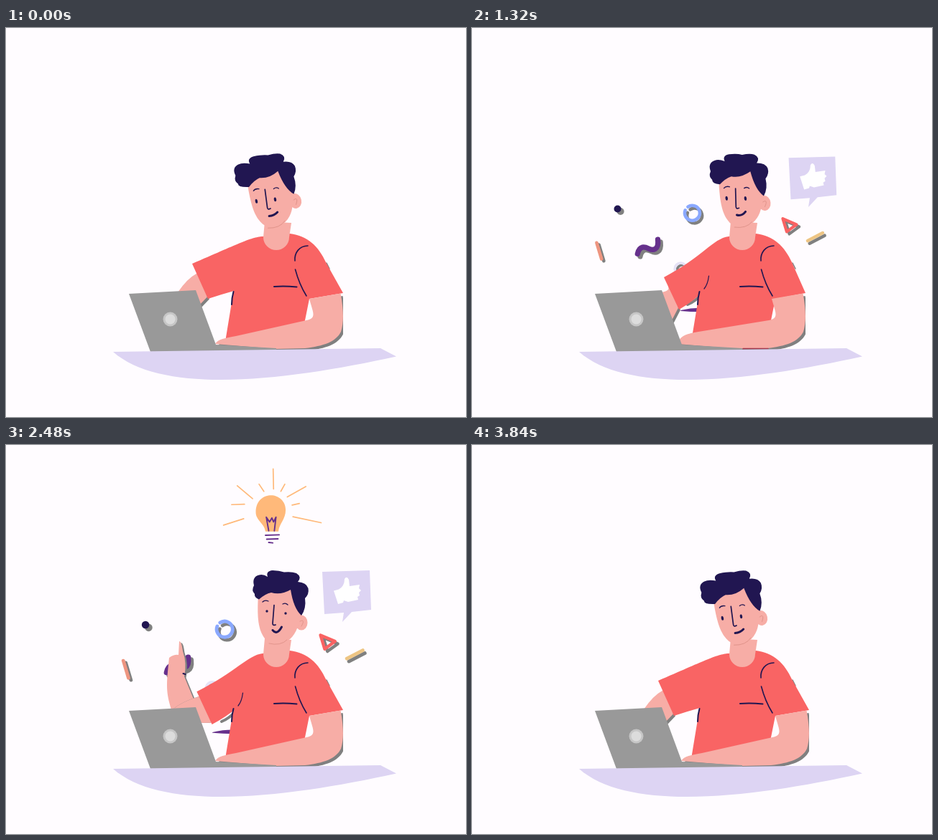
An HTML page with a canvas for the animation above (3880 ms loop, 640 by 543 pixels).

```html
<!DOCTYPE html>
<html lang="en">
<head>
<meta charset="utf-8">
<title>Idea at the laptop</title>
<style>
html, body { margin: 0; width: 640px; height: 543px; overflow: hidden; background: #fffcff }
canvas { display: block }
</style>
</head>
<body>
<canvas id="stage" width="640" height="543"></canvas>
<script>
const LOOP = 3880;
const ctx = document.getElementById('stage').getContext('2d');
const SKIN = '#f7ada6', SHIRT = '#f96464', NAVY = '#211651', LAVENDER = '#ddd4f3',
  PURPLE = '#66308c', ORANGE = '#ffb97a', GREY = '#999', SHADOW = '#808080';

const mix = (a, b, u) => a + (b - a) * u;

// Value at time t of a track of time, value pairs, with sine easing.
function track(t, ...k) {
  if (t <= k[0]) return k[1];
  for (let i = 2; i < k.length; i += 2)
    if (t < k[i]) {
      const u = (t - k[i - 2]) / (k[i] - k[i - 2]);
      return mix(k[i - 1], k[i + 1], (1 - Math.cos(Math.PI * u)) / 2);
    }
  return k[k.length - 1];
}

function fill(d, color) {
  ctx.fillStyle = color;
  ctx.fill(new Path2D(d));
}

function line(d, color, width) {
  ctx.strokeStyle = color;
  ctx.lineWidth = width;
  ctx.stroke(new Path2D(d));
}

function group(draw) {
  ctx.save();
  draw();
  ctx.restore();
}

// Draws a shape over a hard grey copy of itself.
function shaded(paint, d, color, dx, dy, width) {
  group(() => { ctx.translate(dx, dy); paint(d, SHADOW, width); });
  paint(d, color, width);
}

function scaleAt(x, y, s) {
  ctx.translate(x, y);
  ctx.scale(s, s);
}

function doodles(t) {
  const s = track(t, 80, 0, 600, 1.08, 1240, .9, 1720, 1.05, 2280, .93, 2840, 1.05, 3380, 0);
  if (s <= 0) return;
  group(() => {
    scaleAt(330 + 15 * Math.min(1, s * 1.1), 277, s);
    ctx.translate(-345, -277);
    shaded(fill, 'M183 250a5.5 5.5 0 1 0 11 0a5.5 5.5 0 1 0-11 0', NAVY, 4.5, 4);
    shaded(line, 'M156.500 302L164 327', '#ee9580', 3.5, 3, 5);
    shaded(line, 'M219 319C222 306 230 308 236 311S252 314 250 297', PURPLE, 4, 4, 8);
    shaded(line, 'M296 247A11.500 11.500 0 1 1 292 252', '#8aa8ff', 3.5, 4, 5);
    shaded(line, 'M441 265L462 274L447 285Z', '#fa6262', 4, 3.5, 4.5);
    shaded(line, 'M479 299L502 287', '#eec584', 3, 4, 5);
    shaded(line, 'M276 342a9 9 0 1 0 18 0a9 9 0 1 0-18 0', '#e6e2f6', 3, 3, 4);
    fill('M285 405.500Q300 402 314 402V408Q300 408 285 406.500Z', PURPLE);
  });
}

function bubble(t) {
  const s = track(t, 640, 0, 960, 1.14, 1300, .98, 1520, 1, 3210, 1, 3380, 0);
  if (s <= 0) return;
  group(() => {
    scaleAt(468, 247 + track(t, 640, 0, 960, -14, 1320, 3, 1520, 0), s);
    ctx.rotate(track(t, 640, -20, 960, -8, 1300, 0) * Math.PI / 180);
    ctx.translate(-468, -247);
    fill('M440 177L506 175L508 230L481 233L468 247L470 234L443 236Z', LAVENDER);
    fill('M456 203.500L463 201.500Q471 197 471 187Q474 182 477 188L478 197L492 195L491 200L494 203L491 206' +
      'L492 210L489 212L490 216L476 219L470 217L469 220L462 222Z', '#fff');
  });
}

function bulb(t) {
  const s = track(t, 2040, 0, 2340, 1.254, 2616, 1, 3370, 1, 3600, 0);
  if (s <= 0) return;
  group(() => {
    scaleAt(370, 241, s);
    ctx.translate(-370, -241);
    line('M371.500 56L372 81M327 77L346 93M412 78L389 91M354 75L360 84M386 75L381 84' +
      'M320 100.500L336 100M395 101L404 99M310 126L335 118M396 115.500L431 123', ORANGE, 1.5);
    fill('M350 110C350 95 360 89 369 89S387 96 387 107C387 119 379 124 378 134H362C361 124 350 120 350 110', ORANGE);
    line('M366 133L363 116L367 122L370 117L372 122L375 116L373 133', PURPLE, 1.7);
    line('M362 138.500L379 138M363.500 143.500L377.500 143M366 147.500L371 148', PURPLE, 1.7);
  });
}

// The sleeve hem, from its outer tip to its lower corner.
const hem = (drop, u) => [
  mix(mix(259, 267, drop), mix(281, 288, drop), u),
  mix(mix(329, 348, drop), mix(378, 393, drop), u)
];

function rearArm(t, drop) {
  const raise = track(t, 1400, 0, 1700, 1, 3380, 1, 3640, 0);
  const lower = track(t, 1640, 96, 2040, 4, 2400, 0, 2560, 0, 3100, 8, 3340, 8, 3660, 96);
  if (lower < 96) group(() => {
    ctx.translate(0, lower);
    shaded(fill, 'M231 372C222 345 223 335 227 297Q234 292 240 293L241 274Q244 273 246 288' +
      'Q252 305 248 323L262 357L270 372Z', SKIN, 2.5, 2);
    line('M246.500 319L249.500 320', NAVY, 2);
  });
  const x = mix(mix(239, 263, drop), 232, raise);
  const [topX, topY] = hem(drop, mix(.28, .15, raise));
  const [lowX, lowY] = hem(drop, .95);
  const tuck = drop * (1 - raise);
  shaded(fill, `M${topX + 6} ${topY}H${topX}Q${x + 13} ${topY + 7} ${x} 369V376` +
    `L${mix(268, 277, tuck)} ${mix(388, 410, tuck)}L${lowX} ${lowY}Z`, SKIN, mix(3, 0, raise), mix(3, 0, raise));
}

function torso(drop, reach) {
  const [tipX, tipY] = hem(drop, 0);
  const [hemX, hemY] = hem(drop, 1);
  if (drop > .7) line('M300 386Q310 382 318 373', SHADOW, 4);
  line('M446 328L450 336', SHADOW, 1.5);
  fill(`M357 291C${mix(340, 335, drop)} ${mix(292, 294, drop)} 322 ${mix(302, 319, drop)} ${tipX} ${tipY}` +
    `L${hemX} ${hemY}Q${mix(299, 309, drop)} ${mix(372, 381, drop)} ${mix(317, 322, drop)} 367L316 371` +
    `L305 438L410 430L416 408L422 378L${469 - 5 * reach} 370L445 327C435 305 420 290 395 287Z`, SHIRT);
  line('M316.500 368Q314 377 314 386', NAVY, 2);
  if (drop > .7) line('M329.500 346Q328 358 323 364', NAVY, 1.2);
  line('M402 325C401 314 408 304 420 304M402.500 337Q408 358 418 374', NAVY, 1.6);
  line('M373 361Q388 360 404.500 361.500', NAVY, 2);
}

function frontArm(reach) {
  const lift = 6 * reach;
  group(() => {
    ctx.translate(-5 * reach, 0);
    ctx.beginPath();
    ctx.rect(0, 0, 469, 543);
    ctx.clip();
    shaded(fill, 'M422 378L465.500 370.500C470 395 470 411 466 424C459 438 442 444 416 447L376 448L291 441' +
      `C295 ${434 - lift} 305 ${433 - lift} 320 ${430 - lift}L418 408C428 406 429 402 426 392Z`, SKIN, 3, 3.5);
  });
  if (reach > .1) line('M377 447.500H412', '#a83a50', 1.5);
}

function head(t) {
  const up = track(t, 1100, 0, 1540, 1, 3160, 1, 3760, 0);
  const alert = up * up;
  const down = 1 - alert;
  fill('M360 270L358 292A18 18 0 0 0 394 292L397 272Z', SKIN);
  group(() => {
    ctx.translate(376, 285);
    ctx.rotate((up - 1) * 12 * Math.PI / 180);
    ctx.translate(-376, -285);
    ctx.fillStyle = SKIN;
    ctx.beginPath();
    ctx.ellipse(411, 248, 8.5, 10.5, 0, 0, 7);
    ctx.fill();
    fill('M351 208C349 242 351 258 360 270Q369 280 381 278Q398 274 405 256L412 236L400 195Z', SKIN);
    line('M366 277Q382 281 391 272', '#dc8f86', .8);
    line('M409 246Q415 243 413 249L411 253', '#dc8f86', .8);
    line('M373 223.500L371 249Q371 252.500 375 251', NAVY, 1.7);

    const open = track(t, 2380, 3, 2450, 1.8, 2500, 1.8, 2580, 3);
    ctx.fillStyle = NAVY;
    for (const [x, y] of [[363, 232], [389, 235]]) {
      ctx.beginPath();
      ctx.ellipse(x - 5 * down, y + 5 * down, 1.7, open, 0, 0, 7);
      ctx.fill();
    }
    group(() => {
      ctx.translate(0, 3 * down);
      line('M357 219Q360 216 365 218M385 222Q389 220 392 223', NAVY, 1.3);
    });
    line(`M371 ${mix(261, 258.5, alert)}Q${mix(378, 377, alert)} ${mix(262, 266, alert)} ` +
      `383.500 ${mix(258, 254, alert)}`, NAVY, 3);

    const wide = 8 * (1 - up);
    fill(`M352 215.500Q${345 - wide} 213 ${346 - wide} 208Q${341 - wide} 203 ${345 - wide} 196` +
      `Q${342 - wide} 184 ${352 - wide} 181.500Q${358 - wide} 180 ${364 - wide / 2} 184` +
      `Q${361 - wide / 2} 176 ${371 - wide / 2} 175Q380 175 387 177.500Q398 176.500 404 179Q412 184 406 191` +
      'Q418 192 420.500 200Q422 208 416 214Q418 228 411 238Q400 228 396 202Q382 210 369 206Q360 208 352 215.500', NAVY);
  });
}

function desk() {
  fill('M171 371L264 366L292 442L376 447V451L201 452Z', GREY);
  for (const [r, color] of [[10, '#c6c6c6'], [7, '#dcdcdc']]) {
    ctx.fillStyle = color;
    ctx.beginPath();
    ctx.arc(228.5, 406.5, r, 0, 7);
    ctx.fill();
  }
  fill('M149 452L521 447L543 458.500C400 490 220 515 149 452', LAVENDER);
}

function draw(now) {
  const t = now % LOOP;
  const drop = track(t, 400, 0, 1320, 1, 1920, .95, 2480, .8, 3300, .8, 3760, 0);
  const reach = track(t, 520, 0, 1320, 1, 1760, 0);
  ctx.fillStyle = '#fffcff';
  ctx.fillRect(0, 0, 640, 543);
  ctx.lineCap = ctx.lineJoin = 'round';
  doodles(t);
  bubble(t);
  bulb(t);
  rearArm(t, drop);
  torso(drop, reach);
  frontArm(reach);
  head(t);
  desk();
}

const start = performance.now();
function tick() {
  draw(performance.now() - start);
  requestAnimationFrame(tick);
}
tick();
</script>
</body>
</html>
```
